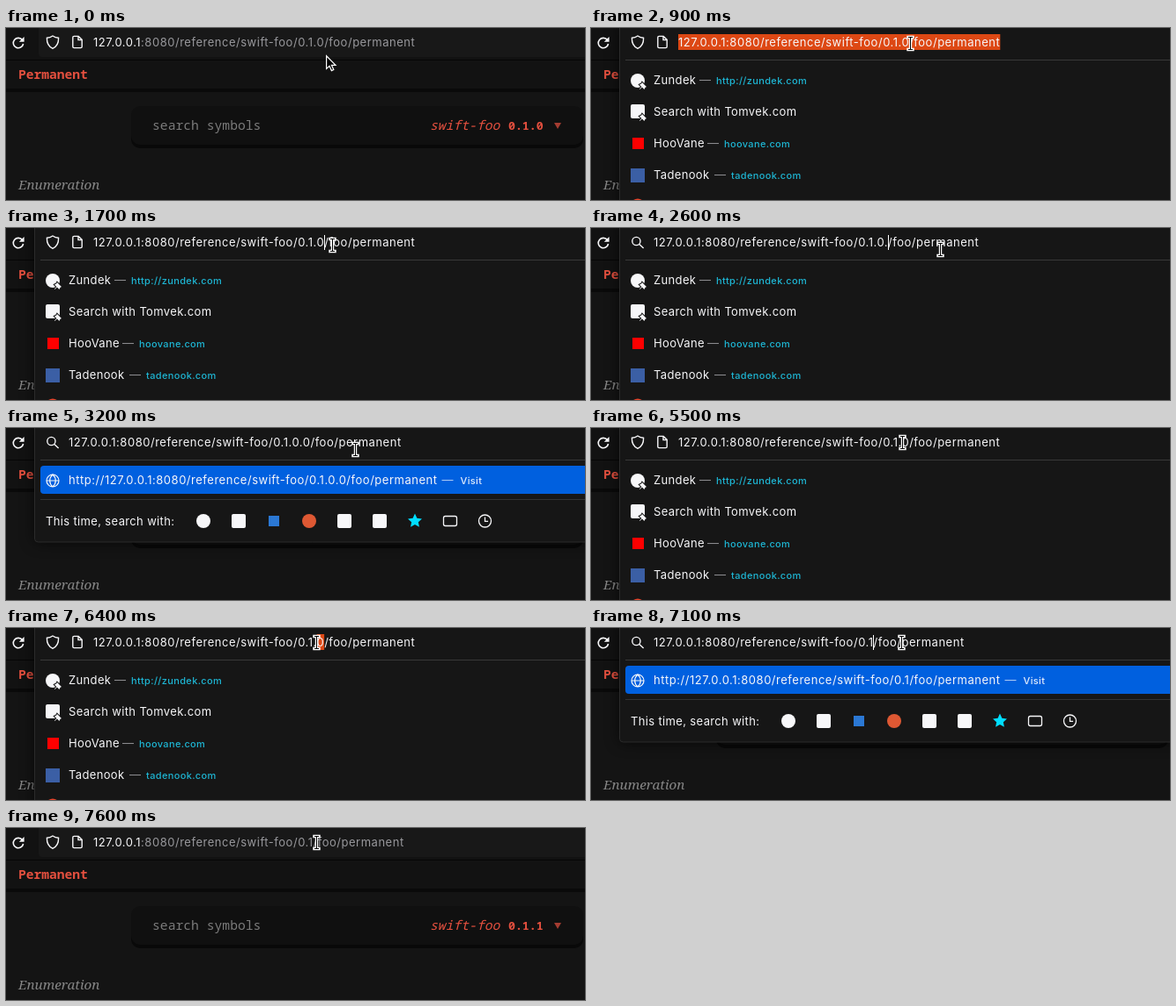
These frames come from a looping animation (657x196 px, 8 s). An HTML page with a canvas:

```html
<!DOCTYPE html>
<html lang="en">
<head>
<meta charset="utf-8">
<title>Version lookup</title>
<style>
html, body { margin: 0; width: 100%; height: 100%; overflow: hidden; background: #141414; }
canvas { display: block; width: 657px; height: 196px; }
</style>
</head>
<body>
<canvas id="stage"></canvas>
<script>
const W = 657, H = 196, LOOP = 8000;
const canvas = document.getElementById('stage');
const ctx = canvas.getContext('2d');
const dpr = window.devicePixelRatio || 1;
canvas.width = W * dpr;
canvas.height = H * dpr;

const SANS = 'Inter, "Noto Sans", sans-serif';
const MONO = '"Noto Sans Mono", "DejaVu Sans Mono", monospace';
const UI = '13px ' + SANS, SMALL = '500 11px ' + SANS;
const WHITE = '#f7f7f9', GREY = '#98989c', RED = '#e5503f', LINK = '#1eb6d4';
const ORANGE = '#dd4814', PANEL = '#161616';
const HOST = '127.0.0.1';
const URL_GAP = 0.52;

// Pointer path: time, x, y
const PATH = [
  [0, 363, 31], [200, 363, 31], [600, 362, 17.5], [1600, 362, 17.5],
  [2000, 396, 24], [2100, 396, 24], [2200, 396, 24.8], [4500, 396, 24.8],
  [4600, 375, 18.5], [4700, 375, 18.5], [4900, 362, 14.5], [5000, 362, 14.5],
  [5300, 353, 16.5], [5600, 353, 16.5], [5900, 358, 16.5], [6300, 358, 16.5],
  [6400, 352, 16.5], [LOOP, 352, 16.5]
];

const between = (t, a, b) => t >= a && t < b;

function font(f, spacing = 0) {
  ctx.font = f;
  ctx.letterSpacing = spacing + 'px';
}

function text(s, x, y, color, f = UI, spacing = 0) {
  font(f, spacing);
  ctx.fillStyle = color;
  ctx.fillText(s, x, y);
  return x + ctx.measureText(s).width;
}

const ui = (s, x, y, color = WHITE) => text(s, x, y, color, UI, 0.35);
const address = (s, x, y, color = WHITE) => text(s, x, y, color, UI, URL_GAP);
const small = (s, x, y, color) => text(s, x, y, color, SMALL, 0.35);

function addressWidth(s) {
  font(UI, URL_GAP);
  return ctx.measureText(s).width;
}

function rect(x, y, w, h, color, r = 0) {
  ctx.fillStyle = color;
  ctx.beginPath();
  ctx.roundRect(x, y, w, h, r);
  ctx.fill();
}

function disc(x, y, r, color) {
  ctx.fillStyle = color;
  ctx.beginPath();
  ctx.arc(x, y, r, 0, 7);
  ctx.fill();
}

function stroke(d, color = WHITE, width = 1.4) {
  ctx.strokeStyle = color;
  ctx.lineWidth = width;
  ctx.stroke(new Path2D(d));
}

function fill(d, color) {
  ctx.fillStyle = color;
  ctx.fill(new Path2D(d));
}

function at(x, y, draw) {
  ctx.save();
  ctx.translate(x, y);
  draw();
  ctx.restore();
}

function reloadIcon(loading) {
  at(14, 17, () => {
    if (loading) {
      stroke('M-5 -5L5 5M5 -5L-5 5', WHITE, 1.6);
    } else {
      stroke('M4.6 -3.3A5.7 5.7 0 1 0 5.6 1', WHITE, 1.6);
      fill('M6.6 -7V-1.2H.8Z', WHITE);
    }
  });
}

function siteIcons() {
  at(53, 16, () => stroke('M0 -7C2 -5.6 4.2 -4.9 6.6 -4.7C6.8 1 4.8 5.2 0 7.4C-4.8 5.2 -6.8 1 -6.6 -4.7C-4.2 -4.9 -2 -5.6 0 -7Z'));
  at(81, 16, () => {
    stroke('M-5.2 -5.2Q-5.2 -6.6 -3.8 -6.6H1.2L5.2 -2.6V5.2Q5.2 6.6 3.8 6.6H-3.8Q-5.2 6.6 -5.2 5.2Z');
    stroke('M1 -6.4V-2.4H5');
  });
}

function searchIcon() {
  stroke('M56 15A4.6 4.6 0 1 1 46.8 15A4.6 4.6 0 1 1 56 15M54.8 18.4L59.6 23');
}

function pin(x, y) {
  at(x, y, () => {
    const d = 'M-1 -4L4 1L2.6 1.8L1.4 4L-1 1.6L-3.6 4L-4 3.6L-1.6 1L-4 -1.4L-1.8 -2.6Z';
    stroke(d, PANEL, 2);
    fill(d, WHITE);
  });
}

function page(version, active) {
  rect(0, 0, W, H, '#141414');
  rect(0, 0, W, 36, '#121212');
  if (!active) rect(37, -8, W, 41, '#181818', 4);
  rect(0, 36, W, 1, '#050505');
  rect(0, 37, W, 32, '#121212');
  rect(0, 69, W, 4, '#0a0a0a');
  text('Permanent', 14, 58, RED, 'bold 14.6px ' + MONO);

  rect(142, 92, 513, 45, '#090909', 10);
  rect(142, 89, 513, 44, '#101010', 10);
  text('search symbols', 166, 116, '#7b7b7b', '14.7px ' + MONO);
  text('swift-foo', 481, 116, RED, 'italic 14.7px ' + MONO);
  text(version, 570, 116, RED, 'bold 13.2px ' + MONO);
  fill('M622 108H630L626 115Z', '#a43c31');
  text('Enumeration', 14, 184, '#868686', 'italic 15.2px "Noto Serif", serif');
}

function panel(h) {
  ctx.save();
  ctx.shadowColor = 'rgba(0,0,0,.75)';
  ctx.shadowBlur = 16 * dpr;
  rect(33, -10, W, h + 10, PANEL, 4);
  ctx.restore();
  ctx.strokeStyle = '#2b2b2b';
  ctx.lineWidth = 1;
  ctx.beginPath();
  ctx.roundRect(32.5, -10.5, W, h + 10.5, 4);
  ctx.stroke();
  rect(39, 36, W, 1, '#393939');
}

function site(name, y, linkX, link) {
  ui(name, 71, y);
  ui('—', linkX - 19, y, '#8b8b8e');
  small(link, linkX, y, LINK);
}

function topSites() {
  panel(230);
  disc(53, 60, 8, WHITE);
  pin(59, 66);
  rect(45, 87, 16, 16, WHITE, 2);
  pin(59, 102);
  rect(47, 125, 13, 13, '#f00');
  rect(45, 160, 16, 16, '#3b5fa5');
  disc(53, 203, 8.5, '#e8452c');
  site('Zundek', 64, 142, 'http://zundek.com');
  ui('Search with Tomvek.com', 71, 100);
  site('HooVane', 136, 151, 'hoovane.com');
  site('Tadenook', 172, 159, 'tadenook.com');
}

function visitPanel(url) {
  panel(130);
  rect(39, 43, W, 32, '#0060df', 4);
  at(53, 60, () => {
    stroke('M-7 0A7 7 0 1 1 7 0A7 7 0 1 1 -7 0M-7 0H7M0 -7C-4.4 -3 -4.4 3 0 7C4.4 3 4.4 -3 0 -7', WHITE, 1.2);
  });
  const end = address('http://' + url, 71, 64);
  ui('—', end + 5, 64, '#a9c8f4');
  small('Visit', end + 26, 64, '#e4eefc');
  rect(39, 81, W, 1, '#333');

  ui('This time, search with:', 45, 111);
  disc(224, 106, 8, WHITE);
  rect(256, 98, 16, 16, WHITE, 2);
  rect(298, 100, 12, 12, '#2b78d4');
  disc(344, 106, 8, '#de5833');
  rect(376, 98, 16, 16, WHITE, 2);
  rect(416, 98, 16, 16, WHITE, 2);
  star(464, 106, 8.4, '#00ddff');
  ctx.strokeStyle = WHITE;
  ctx.lineWidth = 1.3;
  ctx.beginPath();
  ctx.roundRect(496.5, 100.5, 15, 11, 2);
  ctx.stroke();
  at(543.5, 106, () => stroke('M-7 0A7 7 0 1 1 7 0A7 7 0 1 1 -7 0M0 -4.4V0.3H3.6', WHITE, 1.3));
}

function star(x, y, r, color) {
  ctx.fillStyle = color;
  ctx.beginPath();
  for (let i = 0; i < 10; i++) {
    const a = i * Math.PI / 5 - Math.PI / 2, k = i % 2 ? r * 0.48 : r;
    ctx.lineTo(x + k * Math.cos(a), y + k * Math.sin(a));
  }
  ctx.fill();
}

function beam() {
  const d = 'M-2.5 -7H2.5M0 -7V7M-2.5 7H2.5';
  ctx.lineCap = 'square';
  stroke(d, '#fff', 3.4);
  ctx.lineCap = 'butt';
  stroke(d, '#000', 1);
}

function arrow() {
  const d = 'M.6 .8V15.4L4 12.2L6.4 17.6L8.8 16.5L6.4 11.3H11Z';
  fill(d, '#000');
  stroke(d, '#fff', 1.2);
}

function pointer(t) {
  const s = Math.floor(t / 100) * 100;
  const i = PATH.findIndex((p, n) => n && p[0] >= s);
  const [t0, x0, y0] = PATH[i - 1], [t1, x1, y1] = PATH[i];
  const k = (s - t0) / (t1 - t0);
  const x = x0 + (x1 - x0) * k, y = y0 + (y1 - y0) * k;
  if (y < 26) at(Math.floor(x) + 0.5, Math.floor(y) + 0.5, beam);
  else at(x, y, arrow);
}

function render(t) {
  const active = between(t, 800, 3300) || between(t, 5500, 7500);
  const typed = between(t, 2600, 3300) || between(t, 7000, 7500);
  const visit = between(t, 2800, 3300) || between(t, 7100, 7500);
  const version = t >= 7100 ? '0.1'
    : t >= 7000 ? '0.1.'
    : between(t, 2600, 2700) ? '0.1.0.'
    : between(t, 2700, 3500) ? '0.1.0.0' : '0.1.0';
  const head = HOST + ':8080/reference/swift-foo/';
  const url = head + version + '/foo/permanent';
  const x = typed ? 71 : 99;
  const after = s => x + addressWidth(head + s);
  const caret = s => rect(Math.round(after(s)), 8, 1, 17, '#fff');

  ctx.setTransform(dpr, 0, 0, dpr, 0, 0);
  page(t >= 7600 ? '0.1.1' : '0.1.0', active);
  if (visit) visitPanel(url);
  else if (active) topSites();

  reloadIcon(between(t, 3300, 3500));
  if (typed) searchIcon();
  else siteIcons();

  if (between(t, 800, 1700)) rect(x, 7, addressWidth(url), 18, ORANGE);
  if (between(t, 5800, 7000)) {
    rect(after('0.1.'), 7, after('0.1.0') - after('0.1.'), 18, ORANGE);
  }

  if (active) address(url, x, 21);
  else address(url.slice(HOST.length), address(HOST, x, 21), 21, GREY);

  if (between(t, 1700, 3200) || between(t, 7000, 7500)) caret(version);
  if (between(t, 5500, 5800)) caret('0.1.');
  pointer(t);
}

const start = performance.now();
function tick() {
  render((performance.now() - start) % LOOP);
  requestAnimationFrame(tick);
}
tick();
</script>
</body>
</html>
```
